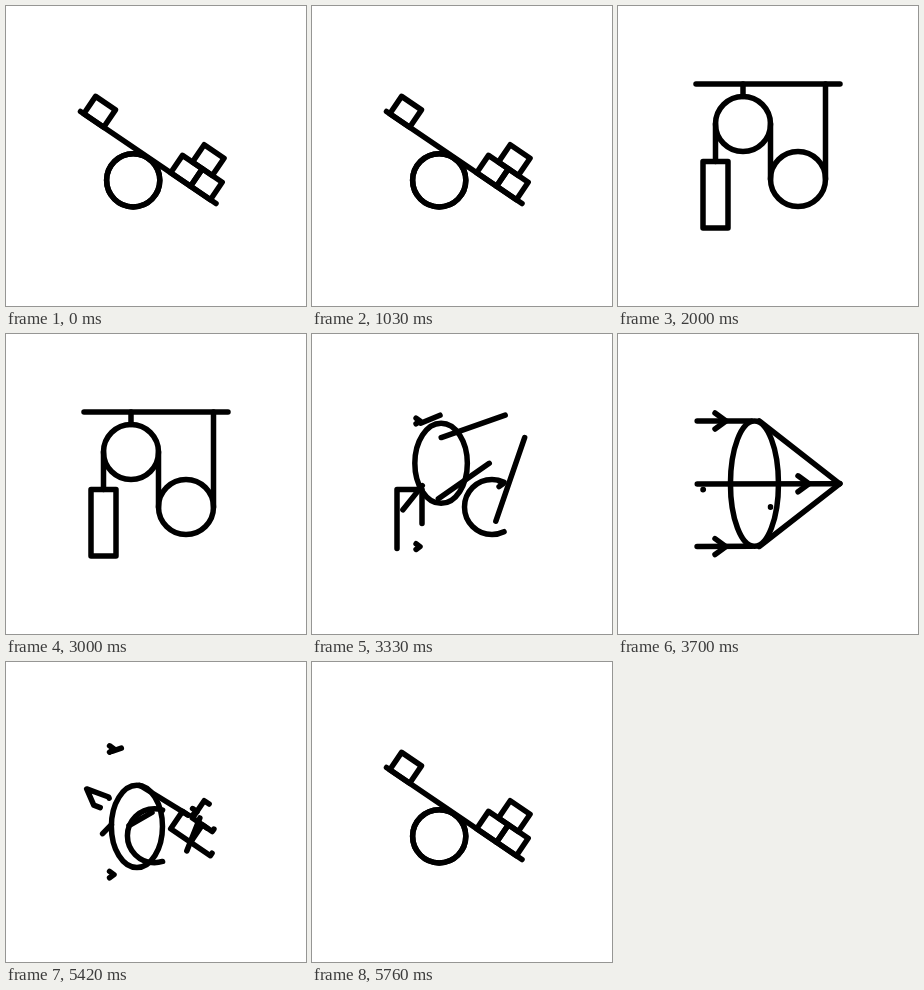
These frames come from a looping animation (300x300 px, 5.79 s). An HTML page:

```html
<!DOCTYPE html>
<html>
<head>
<meta charset="utf-8">
<style>
html, body { margin: 0; height: 100%; overflow: hidden; background: #fff; }
svg { display: block; width: 100%; height: 100%; }
path { fill: none; stroke: #000; stroke-width: 5.5; stroke-linecap: round; stroke-linejoin: round; }
</style>
</head>
<body>
<svg viewBox="0 0 300 300"></svg>
<script>
const LOOP = 5790, FIRST = 1040, STEP = 2000, MOVE = 690;
const svg = document.querySelector('svg');

// Key measures: seesaw plank, pulley wheels and ropes, lens axis and height
const TILT = Math.atan2(92, 135.5), PLANK = { x: 74.5, y: 105.5, len: 163.8 };
const R = 27.5, CEIL = 78, WHEEL1 = { x: 125, y: 118 }, WHEEL2 = { x: 125 + 2 * R, y: 173 };
const AXIS = 149.8, H = 62.8, LEFT = 79, FOCUS = 222, LENS = 136.5;

const along = d => [PLANK.x + d * Math.cos(TILT), PLANK.y + d * Math.sin(TILT)];
const rope = (x, top, bottom) => [x, bottom, x, top];

// Rectangle from its first corner: w along the tilt, h upwards from it
function quad(x, y, w, h, a = 0) {
  const ux = w * Math.cos(a), uy = w * Math.sin(a), vx = h * Math.sin(a), vy = -h * Math.cos(a);
  return [x, y, x + ux, y + uy, x + ux + vx, y + uy + vy, x + vx, y + vy];
}

// Box standing on the plank at distance d, or stacked on a given level
function box(d, level = 0) {
  const [x, y] = along(d), up = 21 * level;
  return quad(x + up * Math.sin(TILT), y - up * Math.cos(TILT), 24, 21, TILT);
}

// Each part has a shape and a drawn fraction for: seesaw, pulley, lens.
// 'start' draws from the first point, 'mid' from the middle, 'loop' and 'oval' both ways round.
const parts = [];
function part(kind, shapes, shown, dot) {
  const el = document.createElementNS('http://www.w3.org/2000/svg', 'path');
  el.setAttribute('pathLength', 1);
  svg.append(el);
  parts.push({ el, kind, shapes, shown, dot });
}
const still = (kind, s, shown) => part(kind, [s, s, s], shown);
const ray = (kind, r, lens) => part(kind, [r, r, lens], [0, 1, 1]);

// plank, ceiling, upper ray
part('start', [[...along(0), ...along(PLANK.len)], [CEIL, CEIL, FOCUS, CEIL],
  [FOCUS, AXIS, 141, AXIS - H]], [1, 1, 1]);

// stem and ropes turn into the other rays
ray('start', rope(WHEEL1.x, CEIL, WHEEL1.y - R), [LEFT, AXIS - H, LENS - 3, AXIS - H]);
ray('mid', rope(WHEEL1.x - R, WHEEL1.y, 155.5), [LEFT, AXIS + H, LENS - 3, AXIS + H]);
ray('start', rope(WHEEL1.x + R, WHEEL1.y, WHEEL2.y), [LEFT, AXIS, FOCUS, AXIS]);
ray('start', rope(WHEEL2.x + R, CEIL, WHEEL2.y), [141, AXIS + H, FOCUS, AXIS]);

// wheels and lens: cx, cy, rx, ry
const base = [127.2, 174.3, 26.6, 26.6];
const wheel1 = [WHEEL1.x, WHEEL1.y, R, R], wheel2 = [WHEEL2.x, WHEEL2.y, R, R];
part('oval', [base, wheel1, [LENS, AXIS, 24, H]], [1, 1, 1]);
part('oval', [base, wheel2, wheel2], [1, 1, 0], true);

// left box turns into the hanging weight; the pile on the right comes and goes
const weight = quad(85, 155.5, 25, -66.5);
part('loop', [box(4), weight, weight], [1, 1, 0], true);
for (const b of [box(109), box(133), box(121, 1)]) still('loop', b, [1, 0, 0]);

// arrowheads
for (const k of [-1, 0, 1]) {
  const x = k ? 108 : 191, y = AXIS + k * H;
  still('mid', [x - 11, y - 8, x, y, x - 11, y + 8], [0, 0, 1]);
}

function outline(kind, v) {
  if (kind === 'oval') {
    const [cx, cy, rx, ry] = v, arc = `a${rx} ${ry} 0 0 1 `;
    return `M${cx - rx} ${cy}${arc}${rx} ${-ry}${arc}${rx} ${ry}${arc}${-rx} ${ry}${arc}${-rx} ${-ry}Z`;
  }
  return 'M' + v.join(' ') + (kind === 'loop' ? 'Z' : '');
}

const ease = t => t < .5 ? 2 * t * t : 1 - 2 * (1 - t) ** 2;
const mix = (a, b, p) => a + (b - a) * p;

function draw(now) {
  const t = Math.max(0, now % LOOP - FIRST);
  const i = Math.floor(t / STEP), j = (i + 1) % 3;
  const p = ease(Math.min(1, t % STEP / MOVE));
  for (const { el, kind, shapes, shown, dot } of parts) {
    const q = mix(shown[i], shown[j], p);
    el.style.display = q > 0 || dot ? '' : 'none';
    el.setAttribute('d', outline(kind, shapes[i].map((a, k) => mix(a, shapes[j][k], p))));
    const closed = kind === 'loop' || kind === 'oval';
    const f = Math.max(q, .0005); // a tiny dash still shows as a round dot
    el.style.strokeDasharray = q >= 1 ? 'none' : `${f} ${closed ? 1 - f : 2}`;
    el.style.strokeDashoffset = closed ? f / 2 : kind === 'mid' ? (f - 1) / 2 : 0;
  }
}

function tick() {
  draw(performance.now());
  requestAnimationFrame(tick);
}
tick();
</script>
</body>
</html>
```
